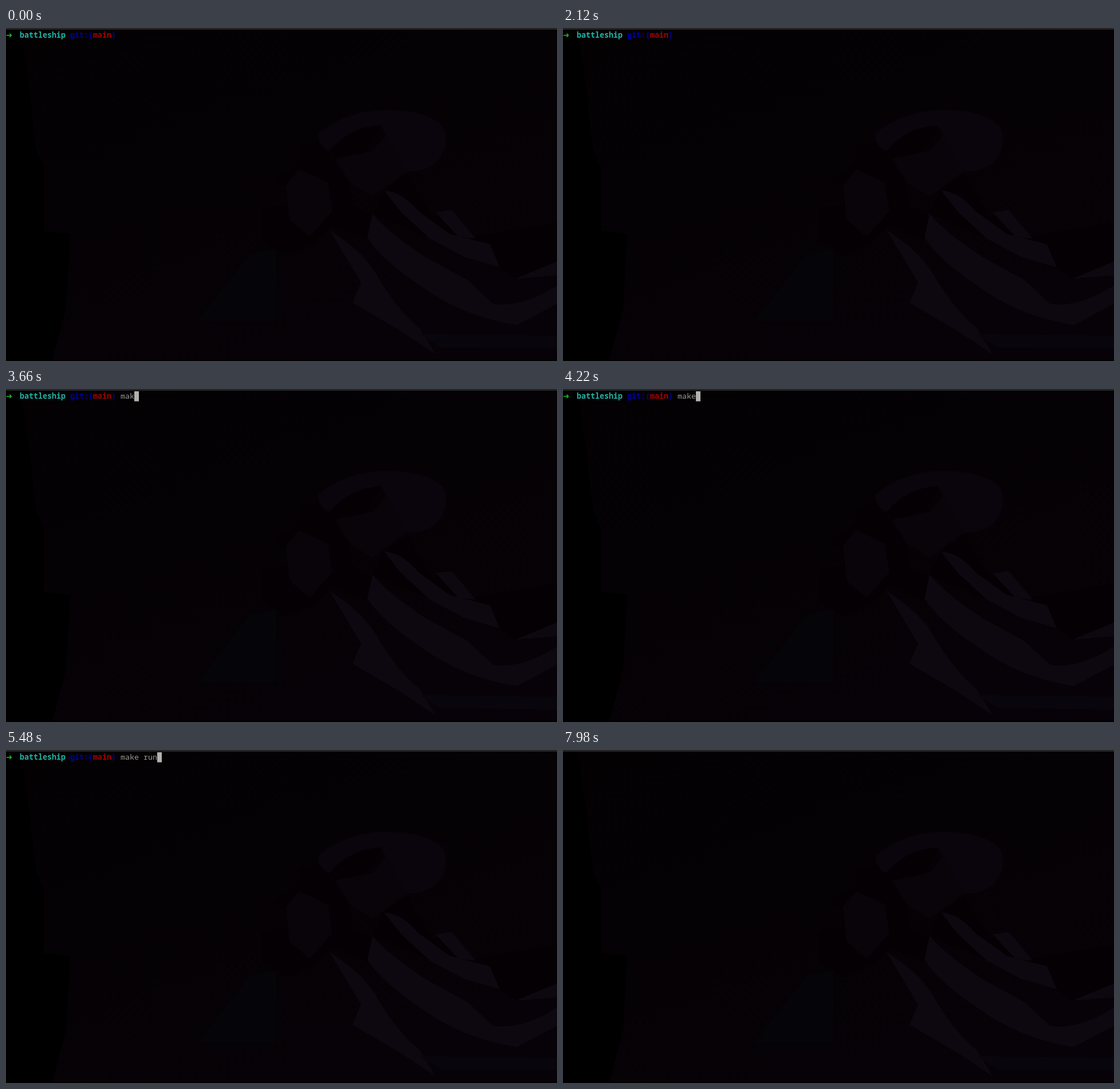
An HTML page for the animation above (8 s loop, 962 by 582 pixels).

```html
<!DOCTYPE html>
<html lang="en">
<head>
<meta charset="utf-8">
<title>Terminal</title>
<style>
  html, body { margin: 0; width: 100%; height: 100%; overflow: hidden; background: #050205; }
  svg { display: block; width: 100vw; height: 100vh; }
  text { font: 13.333px "Noto Sans Mono", "DejaVu Sans Mono", monospace; white-space: pre; }
  .bold { font-weight: 700; }
  .arrow { font-family: "DejaVu Sans", sans-serif; }
</style>
</head>
<body>
<svg viewBox="0 0 962 582" preserveAspectRatio="none">
  <defs>
    <linearGradient id="dusk" x2="0.6" y2="1">
      <stop offset="0" stop-color="#040103"/>
      <stop offset="1" stop-color="#060207"/>
    </linearGradient>
  </defs>
  <!-- dim wallpaper -->
  <rect width="962" height="582" fill="url(#dusk)"/>
  <path fill="#000" d="M0 3H25L40 100 52 210 66 245V355L112 360 105 490 80 582H0Z"/>
  <path fill="#050408" d="M425 395 472 385V512H335Z"/>
  <path fill="#0a050c" d="M545 185Q590 146 660 143 735 143 763 172 778 205 750 236 725 254 700 250L672 205 655 170Q610 172 565 215L548 205Z"/>
  <path fill="#040004" d="M512 205 548 200 600 270 605 310 640 330 630 370 570 345 540 375 490 398 447 370V315L490 310 488 280 466 265 512 235ZM565 215Q600 172 655 170L630 215 575 230Z"/>
  <path fill="#080409" d="M488 275 512 247 562 270 570 320 530 365 495 335ZM575 228 640 215 665 185 700 250 640 295 600 270Z"/>
  <path fill="#040003" d="M660 284 700 255 745 330 778 318 810 365 962 340V408L890 438 860 418 640 325Z"/>
  <g fill="#0d0810">
    <path d="M660 284Q690 285 720 320L775 360 845 378 862 418 800 400 740 368 690 322Z"/>
    <path d="M640 325Q670 360 735 402L805 440 850 482Q900 490 962 450V482L892 519Q800 505 730 455 655 405 631 366Z"/>
    <path d="M565 353Q630 395 652 440 690 500 722 524L750 570 690 530 605 480 620 445Z"/>
    <path d="M750 322 778 318 820 368 790 365Z"/>
    <path d="M890 438 962 408V432Z"/>
  </g>
  <path fill="#09050c" d="M722 535 962 538V560L760 558Z"/>
  <rect width="962" height="3" fill="#232323"/>
  <rect width="962" height="2" y="580" fill="#000"/>
  <g id="prompt">
    <text class="bold arrow" x="0" y="17" fill="#22b322">➜</text>
    <text class="bold" x="24" y="17" fill="#22b3a6">battleship</text>
    <text class="bold" x="112" y="17" fill="#0000a6">git:(<tspan fill="#a60000">main</tspan>)</text>
    <text id="typed" x="200" y="17" fill="#999994"></text>
  </g>
  <rect id="cursor" width="8" height="17.5" fill="#b2b2ad"/>
</svg>
<script>
const LOOP = 8000, CELL = 8, ROW = 18, START = 25;
const COMMAND = "make run";
const KEYS = [2960, 3080, 3660, 4220, 5020, 5200, 5280, 5360];
const ENTER = 6320, CLEAR = 6440;
const HIDDEN = [[0, 440], [2120, 2540], [7980, LOOP]];

const prompt = document.getElementById("prompt");
const typed = document.getElementById("typed");
const cursor = document.getElementById("cursor");
const show = (el, on) => el.setAttribute("visibility", on ? "visible" : "hidden");

function draw(t) {
  const count = KEYS.filter(key => t >= key).length;
  const col = t < ENTER ? START + count : 0;
  const row = t >= ENTER && t < CLEAR ? 1 : 0;
  typed.textContent = COMMAND.slice(0, count);
  show(prompt, t < CLEAR);
  show(cursor, !HIDDEN.some(([from, to]) => t >= from && t < to));
  cursor.setAttribute("x", col * CELL);
  cursor.setAttribute("y", 4 + row * ROW);
}

const begin = performance.now();
function tick() {
  draw((performance.now() - begin) % LOOP);
  requestAnimationFrame(tick);
}
draw(0);
requestAnimationFrame(tick);
</script>
</body>
</html>
```
